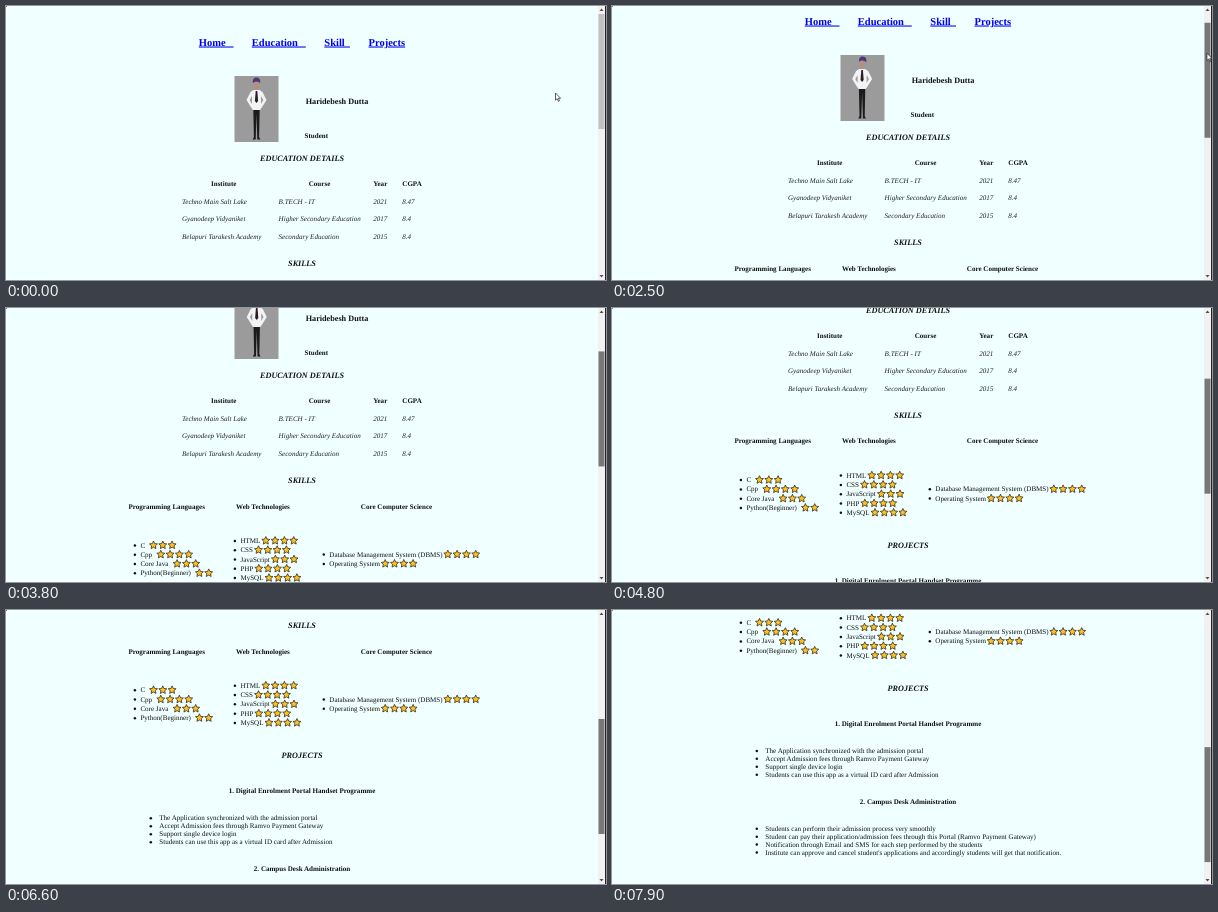
An HTML page for the animation above (8 s loop, 600 by 274 pixels).

```html
<!DOCTYPE html>
<html lang="en">
<head>
<meta charset="utf-8">
<title>Resume page</title>
<style>
html, body { margin: 0; width: 100%; height: 100%; overflow: hidden; background: #f0ffff; }
svg { display: block; }
text {
  font: 7.05px "Liberation Serif", "Times New Roman", serif;
  fill: #111; white-space: pre; text-rendering: geometricPrecision;
}
.b { font-weight: bold; }
.i { font-style: italic; fill: #222; }
.h { font-weight: bold; font-size: 8.2px; }
.t { font-weight: bold; font-style: italic; font-size: 8.2px; }
.a { font-weight: bold; font-size: 10.5px; fill: #00e; text-decoration: underline; }
</style>
</head>
<body>
<svg width="600" height="274" viewBox="0 0 600 274">
  <g id="page">
    <rect x="228.5" y="70" width="44" height="66" fill="#9c9b9b"/>
    <g id="man">
      <path d="M247.3 103h6.4l-.6 28 1.2 2.500h-3l-.8-26-.8 26h-3l1.2-2.500z" fill="#1c1a1c"/>
      <path d="M247.5 84h6l3 2 4 8-5 8-1.5 2h-7l-1.5-2-5-8 4-8z" fill="#f3f3f5"/>
      <path d="M246 90l-2.3 4 2.3 4zM255 90l2.3 4-2.3 4z" fill="#9c9b9b"/>
      <path d="M249.7 85h1.6l.8 10-1.6 2-1.6-2z" fill="#2b1c24"/>
      <g id="head">
        <ellipse cx="250.5" cy="78.5" rx="2.9" ry="5" fill="#b48f83"/>
        <path d="M246.8 77q-.5-5.5 3.7-5.5t3.7 5.5q-3.7-3-7.4 0z" fill="#4b3a78"/>
      </g>
    </g>
  </g>
  <rect width="1" height="1" fill="#777"/>
  <rect x="592" width="7" height="274" fill="#f1f1f1"/>
  <rect x="599" width="1" height="274" fill="#222"/>
  <path d="M593.5 5l2-2.5 2 2.5zM593.5 269l2 2.5 2-2.5z" fill="#505050"/>
  <rect id="thumb" x="592.5" width="6" height="115"/>
  <path id="cursor" d="M0 0v7.2l1.7-1.5 1.2 2.6 1.1-.5-1.2-2.5h2.3z" fill="#fff" stroke="#222" stroke-width=".7"/>
</svg>
<script>
const $ = id => document.getElementById(id);
const page = $('page');

function add(tag, attrs, content = '') {
  const el = document.createElementNS('http://www.w3.org/2000/svg', tag);
  for (const k in attrs) el.setAttribute(k, attrs[k]);
  el.textContent = content;
  page.append(el);
}
const label = (s, x, y, cls = '', anchor = 'start') =>
  add('text', { x, y, class: cls, 'text-anchor': anchor }, s);
const centred = (s, x, y, cls) => label(s, x, y, cls, 'middle');
const bullet = (s, x, y, gap) => {
  add('circle', { cx: x - gap, cy: y - 2.1, r: 1.25, fill: '#111' });
  label(s, x, y);
};

function star(cx, cy) {
  const points = Array.from({ length: 10 }, (_, k) => {
    const r = k % 2 ? 2 : 4.2, a = k * Math.PI / 5;
    return (cx + r * Math.sin(a)).toFixed(2) + ',' + (cy - r * Math.cos(a)).toFixed(2);
  }).join(' ');
  add('polygon', { points, fill: '#ffc022', stroke: '#2a2418', 'stroke-width': .75, 'stroke-linejoin': 'round' });
}

// each skill: name, left edge of its stars, star count
function skills(x, y, rows) {
  rows.forEach(([name, sx, n], k) => {
    const base = y + k * 9.3;
    bullet(name, x, base, 5.5);
    for (let j = 0; j < n; j++) star(sx + 4.8 + j * 9.3, base - 2.3);
  });
}

function project(title, y, lines) {
  centred(title, 296, y, 'b');
  lines.forEach((s, k) => bullet(s, 153.3, y + 27.2 + k * 7.95, 8.5));
}

const nb = '\u00a0';
label('Home' + nb.repeat(3), 192.8, 39.5, 'a');
label('Education' + nb.repeat(3), 245.8, 39.5, 'a');
label('Skill' + nb.repeat(2), 318.3, 39.5, 'a');
label('Projects', 362.5, 39.5, 'a');

label('Haridebesh Dutta', 299.7, 98, 'h');
label('Student', 298.6, 132, 'b');

centred('EDUCATION DETAILS', 296, 155.2, 't');
centred('Institute', 217.7, 180.4, 'b');
centred('Course', 313.5, 180.4, 'b');
label('Year', 367.2, 180.4, 'b');
label('CGPA', 396.3, 180.4, 'b');
[
  ['Techno Main Salt Lake', 'B.TECH - IT', '2021', '8.47'],
  ['Gyanodeep Vidyaniket', 'Higher Secondary Education', '2017', '8.4'],
  ['Belapuri Tarakesh Academy', 'Secondary Education', '2015', '8.4']
].forEach((row, r) => row.forEach((s, c) =>
  label(s, [176, 272.6, 367.2, 396.3][c], 197.9 + r * 17.5, 'i')));

centred('SKILLS', 296, 260, 't');
label('Programming Languages', 122.5, 285.7, 'b');
label('Web Technologies', 230, 285.7, 'b');
label('Core Computer Science', 354.8, 285.7, 'b');
skills(134.4, 324.5, [['C', 142.7, 3], ['Cpp', 150, 4], ['Core Java', 166.3, 3], ['Python(Beginner)', 188.6, 2]]);
skills(234.4, 320, [['HTML', 255, 4], ['CSS', 247.7, 4], ['JavaScript', 264.6, 3], ['PHP', 248, 4], ['MySQL', 258.2, 4]]);
skills(323.3, 333.7, [['Database Management System (DBMS)', 437, 4], ['Operating System', 374.4, 4]]);

centred('PROJECTS', 296, 390.3, 't');
project('1. Digital Enrolment Portal Handset Programme', 425.4, [
  'The Application synchronized with the admission portal',
  'Accept Admission fees through Ramvo Payment Gateway',
  'Support single device login',
  'Students can use this app as a virtual ID card after Admission'
]);
project('2. Campus Desk Administration', 503.2, [
  'Students can perform their admission process very smoothly',
  'Student can pay their application/admission fees through this Portal (Ramvo Payment Gateway)',
  'Notification through Email and SMS for each step performed by the students',
  "Institute can approve and cancel student's applications and accordingly students will get that notification."
]);

// piecewise linear value from [time, value] keys
function track(keys, t) {
  const k = keys.findIndex(key => key[0] > t);
  if (k < 0) return keys[keys.length - 1][1];
  if (!k) return keys[0][1];
  const [t0, v0] = keys[k - 1], [t1, v1] = keys[k];
  return v0 + (v1 - v0) * (t - t0) / (t1 - t0);
}
const scrollKeys = [[1800, 0], [2500, 21], [3100, 59], [3300, 59], [3800, 85],
  [4800, 150.3], [5700, 199.6], [7200, 270.5], [7900, 309.6]];
const cursorX = [[100, 549.5], [1100, 595], [2600, 595], [3000, 601]];
const cursorY = [[100, 87], [1100, 38.5]];

function frame(now) {
  const t = Math.floor(now % 8000 / 100) * 100;
  const scroll = track(scrollKeys, t), bar = scroll * .417;
  page.setAttribute('transform', `translate(0 ${-scroll})`);
  $('thumb').setAttribute('y', 8 + bar);
  $('thumb').setAttribute('fill', t < 1100 ? '#c1c1c1' : t < 1800 ? '#a8a8a8' : '#787878');
  $('cursor').setAttribute('transform', `translate(${track(cursorX, t)} ${track(cursorY, t) + bar})`);
  const sway = Math.sin(t / 1000 * Math.PI);
  $('man').setAttribute('transform', `translate(${-sway * .4} 0)`);
  $('head').setAttribute('transform', `rotate(${sway * 4} 250.5 84)`);
  requestAnimationFrame(frame);
}
frame(0);
</script>
</body>
</html>
```
